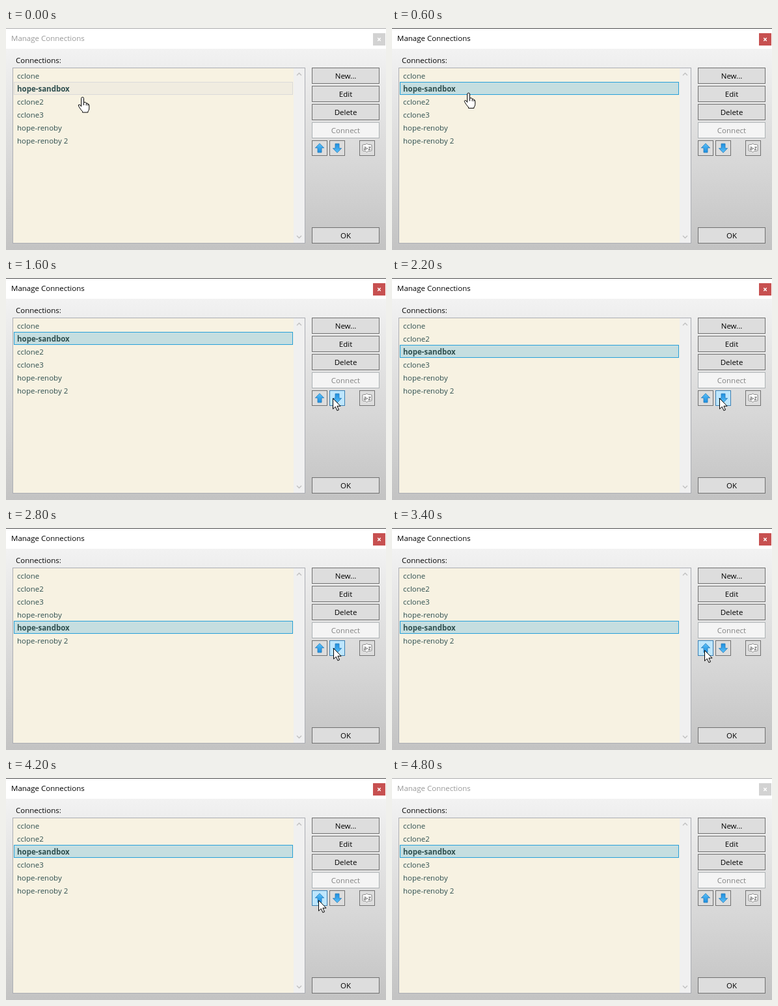
An HTML page that plays this animation: 584x342 px, repeating every 5 s.

```html
<!DOCTYPE html>
<html lang="en">
<head>
<meta charset="utf-8">
<title>Manage Connections</title>
<style>
  html, body { margin: 0; width: 100%; height: 100%; overflow: hidden; }
  svg { display: block; width: 584px; height: 342px; }
  text { font: 11.5px "Open Sans", "Noto Sans", sans-serif; cursor: default; }
  .item { fill: #2f4f4f; }
  .bold { font-weight: 700; }
  .mid { text-anchor: middle; }
  .btn { fill: #ddd; stroke: #707070; }
  .btn.off { fill: #f4f4f4; stroke: #adb2b5; }
  .btn.hot { fill: #bee6fd; stroke: #3c7fb1; }
  .chevron { fill: none; stroke: #bfbfbf; stroke-width: 1.3; }
  .cursor { fill: #fff; stroke: #000; stroke-linejoin: round; }
</style>
</head>
<body>
<svg viewBox="0 0 584 342">
  <defs>
    <linearGradient id="back" x2="0" y2="1">
      <stop stop-color="#f7f7f7"/><stop offset="1" stop-color="#c3c3c3"/>
    </linearGradient>
    <linearGradient id="blue" x2="0" y2="1">
      <stop stop-color="#5cc0f8"/><stop offset="1" stop-color="#1b8ee0"/>
    </linearGradient>
    <path id="arrow" d="M0-7.2L6.7-.3H3V6.8H-3V-.3H-6.7Z" fill="url(#blue)" stroke="#2579b8" stroke-width=".8" stroke-linejoin="round"/>
  </defs>

  <rect width="584" height="342" fill="url(#back)"/>
  <rect width="584" height="32" fill="#fff"/>
  <rect id="edge" width="584" height="1"/>
  <text id="title" x="8" y="20">Manage Connections</text>
  <rect id="close" x="564" y="8" width="19" height="19"/>
  <path d="M571.3 15.3l4.4 4.6m0-4.6l-4.4 4.6" stroke="#fff" stroke-width="1.4"/>

  <text x="15" y="54">Connections:</text>
  <rect x="10.5" y="61.5" width="449" height="270" fill="#f7f2e2" stroke="#abadb3"/>
  <rect x="442" y="62" width="17" height="269" fill="#f0f0f0"/>
  <path class="chevron" d="M447 73l3.5-3.5 3.5 3.5M447 320l3.5 3.5 3.5-3.5"/>
  <rect id="hoverRow" x="12.5" width="428" height="19" fill="#dee8e1" stroke="#6dbcdd"/>
  <rect id="selectedRow" x="12.5" width="428" height="19"/>
  <g id="items"></g>

  <g id="buttons"></g>
  <use href="#arrow" x="482" y="185"/>
  <use href="#arrow" transform="translate(509 185) rotate(180)"/>
  <path d="M549.5 179.5h3l2-1.5 2 1.5h4q1.500 0 1.500 1.500v7q0 1.500-1.500 1.500h-4l-2 2-2-2h-3q-1.500 0-1.500-1.500v-7q0-1.500 1.500-1.500Z" fill="#fafafa" stroke="#8a8a8a"/>
  <text class="mid" x="555" y="187.500" style="font-size:8px;font-weight:600" fill="#555">a-z</text>

  <g id="hand" class="cursor">
    <path d="M-2.300 14.500V2a1.900 1.900 0 0 1 3.800 0v6q3.500-1 3.800 1.300 2.200-.5 2.600 1.300 1.900 0 1.900 2v4.900q0 2.500-1.800 4.500v1.500h-8.500v-1.500q-3-3-5.500-7.500-1.500-2.500 0-3 2-.5 3.700 3Z"/>
    <path d="M1.500 8v4.500M5.300 9.300v3.500M7.900 10.600v2.500" fill="none"/>
  </g>
  <path id="pointer" class="cursor" d="M0 0V16.300L3.800 12.800 6.400 18.700 9 17.600 6.400 11.800H11.500Z"/>
</svg>

<script>
const LOOP = 5000, ROW = 20, FIRST_ROW = 63.5;
const $ = id => document.getElementById(id);

function add(parent, tag, attrs, text = "") {
  const node = document.createElementNS("http://www.w3.org/2000/svg", tag);
  set(node, attrs);
  node.textContent = text;
  return parent.appendChild(node);
}
function set(node, attrs) {
  for (const key in attrs) node.setAttribute(key, attrs[key]);
}
function button(x, y, width, height, label = "", off = false) {
  const box = add($("buttons"), "rect",
    { class: off ? "btn off" : "btn", x: x + .5, y: y + .5, width: width - 1, height: height - 1 });
  add($("buttons"), "text",
    { class: "mid", x: x + width / 2, y: y + 17, fill: off ? "#838383" : "#000" }, label);
  return box;
}

["New...", "Edit", "Delete", "Connect"].forEach((label, i) =>
  button(470, 61 + 28 * i, 104, 25, label, label === "Connect"));
button(470, 307, 104, 25, "OK");
const up = button(470, 173, 24, 24);
const down = button(497, 173, 24, 24);
button(543, 173, 24, 24);

const moving = "hope-sandbox";
const others = ["cclone", "cclone2", "cclone3", "hope-renoby", "hope-renoby 2"];
const rows = [...others, moving].map(name => ({
  name, node: add($("items"), "text", { class: name === moving ? "item bold" : "item", x: 17 }, name)
}));

// [start, cursor, x, y, hovered part]
const cursorSteps = [
  [0, "hand", 118, 106.5],
  [600, "hand", 118, 100],
  [800, "hand", 215, 101],
  [1000, "hand", 446, 156, "row"],
  [1200, "pointer", 488, 168],
  [1400, "pointer", 502.5, 185.5, "down"],
  [2000, "pointer", 503.5, 185.5, "down"],
  [3000, "pointer", 482.5, 188.5, "up"],
  [3400, "pointer", 480.5, 188.5, "up"],
  [4800, ""]
];
// [start, position of the moving row]
const moveSteps = [[0, 1], [1800, 2], [2400, 3], [2800, 4], [3600, 3], [4000, 2]];
const at = (steps, t) => steps.findLast(step => step[0] <= t);

function draw(t) {
  const active = t >= 600 && t < 4800;
  $("edge").setAttribute("fill", active ? "#4a4a4a" : "#aaa");
  $("title").setAttribute("fill", active ? "#000" : "#999");
  $("close").setAttribute("fill", active ? "#c75050" : "#d2d2d2");

  const position = at(moveSteps, t)[1];
  rows.forEach(({ name, node }, i) => {
    const place = name === moving ? position : i < position ? i : i + 1;
    node.setAttribute("y", 78 + ROW * place);
  });
  set($("selectedRow"), {
    y: FIRST_ROW + ROW * position,
    fill: t < 600 ? "#f0ece0" : "#c5dee0",
    stroke: t < 600 ? "#dadada" : "#26a0da"
  });

  const [, cursor, x, y, hovered] = at(cursorSteps, t);
  set($("hoverRow"), { y: FIRST_ROW + ROW * 4, visibility: hovered === "row" ? "visible" : "hidden" });
  up.classList.toggle("hot", hovered === "up");
  down.classList.toggle("hot", hovered === "down");
  for (const id of ["hand", "pointer"]) {
    const shown = id === cursor;
    $(id).setAttribute("visibility", shown ? "visible" : "hidden");
    if (shown) $(id).setAttribute("transform", `translate(${x} ${y})`);
  }
}

const start = performance.now();
function tick() {
  draw((performance.now() - start) % LOOP);
  requestAnimationFrame(tick);
}
tick();
</script>
</body>
</html>
```
